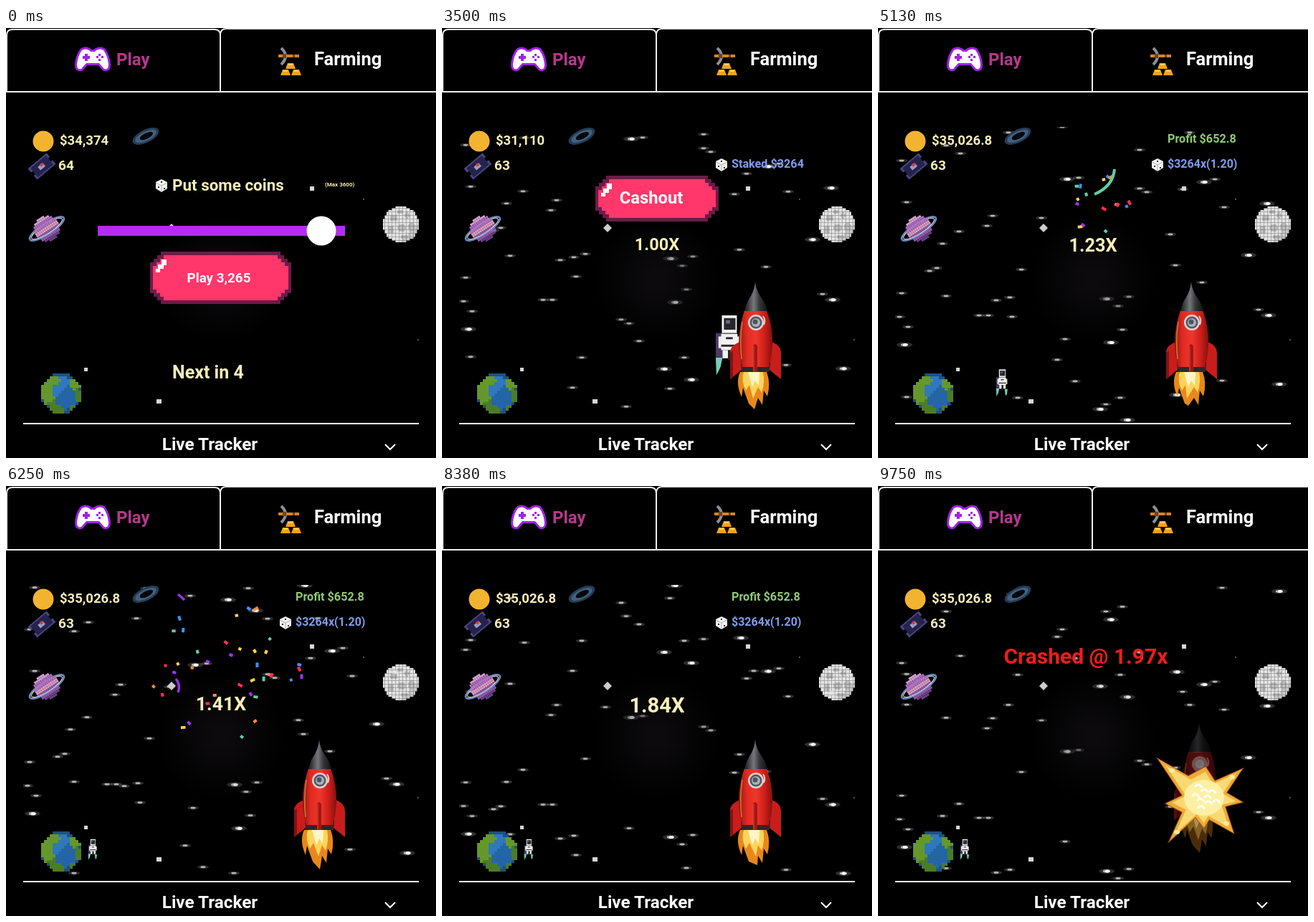
Animation of 600 by 600 pixels, one loop 9880 ms. Source, as an HTML page with a canvas:

```html
<!DOCTYPE html>
<html lang="en">
<head>
<meta charset="utf-8">
<title>Rocket game</title>
<style>
  html, body { margin: 0; width: 100%; height: 100%; overflow: hidden; background: #000; }
  canvas, svg { position: absolute; left: 0; top: 0; width: 600px; height: 600px; }
  text { font-family: Roboto, sans-serif; font-weight: 700; fill: #f8efb8; }
  .white { fill: #fff; }
  .blue { fill: #7f9cea; }
  .mid { text-anchor: middle; }
</style>
</head>
<body>
<canvas id="stage" width="600" height="600"></canvas>
<svg viewBox="0 0 600 600">
  <text x="154" y="52" font-size="24" style="fill:#b4398c">Play</text>
  <text x="430" y="52" font-size="25.5" class="white">Farming</text>
  <text x="284.5" y="589" font-size="24.3" class="white mid">Live Tracker</text>
  <text id="balance" x="75" y="163" font-size="18.5"></text>
  <text id="tickets" x="73" y="198" font-size="19"></text>
  <g id="lobby">
    <text x="232" y="227" font-size="22.4">Put some coins</text>
    <text x="445" y="221" font-size="8">(Max 3600)</text>
    <text id="bet" x="297" y="355" font-size="18.8" class="white mid"></text>
  </g>
  <g id="waiting">
    <text x="232" y="227" font-size="22.5">Staked 3264</text>
    <text x="266" y="281" font-size="23.5" class="mid">Prepare to Cashout</text>
  </g>
  <text id="countdown" x="232" y="489" font-size="25"></text>
  <g id="riding">
    <text x="404" y="195" font-size="16.2" class="blue">Staked $3264</text>
    <text x="292" y="245" font-size="23.8" class="white mid">Cashout</text>
  </g>
  <g id="cashed">
    <text x="404" y="160" font-size="16.2" style="fill:#8fcb72">Profit $652.8</text>
    <text x="404" y="195" font-size="16" class="blue">$3264x(1.20)</text>
  </g>
  <text id="multiplier" x="300" class="mid"></text>
  <text id="crashed" x="290" y="248" font-size="30" class="mid" style="fill:#f01c1c">Crashed @ 1.97x</text>
</svg>
<script>
const LOOP = 9880, BEAT = 125, LAST_BEAT = 78;
const STAKE = 1000, LAUNCH = 2750, CLIMB = 3470, CASHOUT = 4750, CRASH = 8875;
const el = id => document.getElementById(id);
const ctx = el('stage').getContext('2d');
const clamp = v => Math.max(0, Math.min(1, v));
const easeOut = v => 1 - (1 - clamp(v)) ** 3;
const rand = n => { const v = Math.sin(n * 127.1 + 3.7) * 43758.5453; return v - Math.floor(v); };

// x, y, size
const nearStars = [[319,352,2],[264,185,2],[280,183,1],[187,377,1],[165,354,1],[184,350,1],
  [341,395,1],[325,413,2],[350,349,1],[95,348,1],[82,309,1],[310,94,2],[417,74,2],[338,78,1],
  [195,78,1],[113,258,1],[90,275,1],[375,203,1],[365,198,1],[275,55,1],[335,362,1],[72,313,1],
  [40,489,1],[182,532,1],[435,120,1],[250,437,1],[95,138,1],[408,262,1],[348,521,2]];
const farStars = [[517,307,2],[545,391,2],[531,383,1],[42,407,1],[37,432,2],[154,391,1],[141,391,1],
  [261,424,1],[33,360,1],[30,393,1],[483,240,1],[543,235,2],[452,345,1],[415,321,1],[33,175,1],
  [40,233,1],[228,255,1],[160,252,1],[152,266,1],[365,160,1],[318,515,1],[95,515,1],[455,205,2],
  [470,201,1],[425,215,1],[200,327,1],[560,75,2],[480,70,1],[257,128,1],[115,165,1]];

function rects(color, ...list) {
  ctx.fillStyle = color;
  for (const r of list) ctx.fillRect(...r);
}
function oval(x, y, rx, ry, color) {
  ctx.fillStyle = color;
  ctx.beginPath();
  ctx.ellipse(x, y, rx, ry, 0, 0, 7);
  ctx.fill();
}
const disc = (x, y, r, color) => oval(x, y, r, r, color);
function shape(d, fill, stroke, width = 2) {
  const path = new Path2D(d);
  if (stroke) { ctx.strokeStyle = stroke; ctx.lineWidth = width; ctx.stroke(path); }
  if (fill) { ctx.fillStyle = fill; ctx.fill(path); }
}
function at(x, y, angle, scale, draw) {
  ctx.save();
  ctx.translate(x, y);
  ctx.rotate(angle * Math.PI / 180);
  ctx.scale(scale, scale);
  draw();
  ctx.restore();
}
function inSky(draw) {
  ctx.save();
  ctx.beginPath();
  ctx.rect(24, 138, 552, 413);
  ctx.clip();
  draw();
  ctx.restore();
}
function gradient(x0, x1, ...stops) {
  const g = ctx.createLinearGradient(x0, 0, x1, 0);
  for (const [color, p] of stops) g.addColorStop(p, color);
  return g;
}
function pixelDisc(cx, cy, r, cell, colorAt) {
  for (let y = -r; y < r; y += cell)
    for (let x = -r; x < r; x += cell) {
      const u = (x + cell / 2) / r, v = (y + cell / 2) / r;
      if (u * u + v * v < 1) rects(colorAt(u, v), [cx + x, cy + y, cell, cell]);
    }
}
const inBlob = (u, v, blobs) =>
  blobs.some(([x, y, rx, ry]) => ((u - x) / rx) ** 2 + ((v - y) / ry) ** 2 < 1);

function pixelBox(x, y, w, h, color, s = 5) {
  for (let k = 0; k < 4; k++)
    rects(color, [x + k * s, y + (3 - k) * s, w - 2 * k * s, h - 2 * (3 - k) * s]);
}
function button(x, y, w, h) {
  pixelBox(x, y, w, h, '#6b1c48');
  pixelBox(x + 4, y + 5, w - 8, h - 10, '#ff376a');
  rects('#fff', [x + 16, y + 11, 7, 8], [x + 11, y + 18, 8, 6], [x + 8, y + 24, 6, 5]);
}
function dice(x, y) {
  shape(`M${x} ${y - 9}l8 4v9l-8 5l-8 -5v-9z`, '#f4f4f4');
  shape(`M${x - 8} ${y - 4}l8 4l8 -4M${x} ${y}v9`, null, '#a9a9a9', 1);
  rects('#333', [x - 1, y - 6, 2, 2], [x - 5, y + 1, 2, 2], [x + 3, y + 3, 2, 2]);
}

function drawHeader() {
  shape('M1 89V10Q1 2 9 2H291Q299 2 299 10V89M299 10Q299 1 307 1H600M0 89H600', null, '#eee');
  shape('M24 552H576M529 581l7 7l7 -7', null, '#fff');
  shape('M106 31q5-3 10 0l2 2h6l2-2q6-3 10 0q6 8 7 20q0 8-6 6l-7-8h-18l-7 8q-6 2-6-6q1-12 7-20z',
    '#fff', '#a021e8', 6);
  rects('#a021e8', [110, 36, 4, 10], [107, 39, 10, 4], [129, 36, 3, 3], [129, 43, 3, 3],
    [126, 39, 3, 3], [133, 39, 3, 3]);
  shape('M384 28q12 11 0 23', null, '#8b8f98', 4);
  rects('#d9822b', [380, 37, 29, 4]);
  rects('#6b4428', [386, 36, 5, 6], [400, 37, 3, 4]);
  for (const [x, y] of [[397, 49], [390, 58], [405, 58]]) {
    shape(`M${x - 4} ${y}h8l3 8h-14z`, '#f3a21b');
    rects('#ffd45a', [x - 3, y + 1, 6, 2]);
  }
}

function drawSaturn() {
  const ring = (begin, end) => {
    for (const [r, color, w] of [[28, '#7288b5', 3], [25, '#d2d9ee', 1]]) {
      ctx.strokeStyle = color;
      ctx.lineWidth = w;
      ctx.beginPath();
      ctx.ellipse(0, 0, r, r * 0.27, 0, begin, end);
      ctx.stroke();
    }
  };
  at(57, 280, -33, 1, () => {
    const bands = ['#d9a4d8', '#b06fc0', '#e0a0c4', '#9a58ad', '#70408c'];
    ring(Math.PI, 2 * Math.PI);
    pixelDisc(0, 0, 18, 3, (u, v) => bands[Math.floor((v + 1) * 2.5)]);
    ring(0, Math.PI);
  });
}

function drawSpaceProps() {
  const glow = ctx.createRadialGradient(300, 350, 10, 300, 350, 90);
  glow.addColorStop(0, 'rgba(20,17,21,.6)');
  glow.addColorStop(1, 'rgba(20,17,21,0)');
  rects(glow, [200, 250, 200, 200]);

  disc(52, 158, 14.5, '#f2b430');
  at(50, 193, -40, 1, () => {
    rects('#4a4684', [-17, -10, 34, 20]);
    rects('#25224d', [-14, -8, 28, 16]);
    rects('#000', [-18, -3, 4, 6], [14, -3, 4, 6]);
    rects('#9aa0c8', [-5, -3, 9, 6]);
    rects('#e0323c', [-1, -4, 4, 4]);
  });
  at(195, 151, -26, 1, () => {
    oval(0, 0, 20, 9, '#263c55');
    oval(0, 0, 16, 6.5, '#41617f');
    oval(1, 0, 10, 4, '#05070c');
  });
  drawSaturn();

  const craters = [[-.4, -.35, .25, .2], [.35, -.5, .2, .16], [.05, .2, .22, .2], [-.55, .3, .17, .2],
    [.6, .15, .18, .25], [.2, .7, .25, .12], [-.05, -.7, .13, .12]];
  pixelDisc(551, 274, 25, 2.5, (u, v) =>
    inBlob(u, v, craters) ? '#bdbdbd' : u + v > .95 ? '#c9c9c9' : '#e3e3e3');
  const land = [[-.72, -.1, .33, .42], [-.4, -.65, .38, .25], [-.55, .35, .3, .3], [-.2, .82, .35, .2],
    [.72, -.5, .25, .32], [.9, .15, .18, .3], [.55, .72, .2, .18]];
  pixelDisc(77, 510, 28, 4, (u, v) => inBlob(u, v, land)
    ? (u + v * 2 > .3 ? '#4b7d24' : '#65982c')
    : (u * u + v * v > .7 ? '#1d527f' : u + v < 0 ? '#2f78bd' : '#2465a5'));

  rects('#d6d6d6', [424, 221, 6, 6], [109, 474, 5, 5], [210, 518, 7, 6]);
  shape('M231 273l6 6l-6 6l-6 -6z', '#ccc');
  rects('#555', [574, 434, 2, 2], [498, 238, 2, 2]);
}

function drawStars(stars, speed, t) {
  for (const [x, y, size] of stars) {
    const drop = y + speed * (t - 4375) / 1000 - 138;
    const py = 138 + ((drop % 412) + 412) % 412;
    oval(x, py, 5 + size * 3, 1.5 + size, 'rgba(150,150,150,.3)');
    oval(x, py, 2 + size * 1.6, .7 + size * .7, 'rgba(225,225,225,.75)');
    if (size > 1) oval(x + 1, py, 3, 2, '#fff');
  }
}

function drawHourglass(beat) {
  at(301, 347, -48 + (beat - 17) * 45, 1, () => {
    shape('M-12 -23H12V-16L3 -2H-3L-12 -16Z', null, '#fff', 4);
    shape('M-3 -2H3L14 13V24H-14V13Z', '#fff');
    rects('#fff', [-7, -10, 14, 5], [-4, -5, 8, 5]);
  });
}

function drawAstronaut(x, y, scale) {
  at(x, y, 0, scale, () => {
    rects('#4a3a66', [-19, -14, 10, 36]);
    rects('#f2f2f2', [-10, -40, 22, 26], [-11, -13, 24, 24], [-9, 11, 8, 12], [4, 11, 8, 12],
      [-15, -9, 5, 17], [12, -9, 5, 17]);
    rects('#26262c', [-7, -36, 17, 17], [-4, -8, 10, 3], [-11, 3, 24, 3], [-1, 12, 5, 14]);
    rects('#6b6b78', [-4, -33, 6, 5]);
    shape('M-19 22h10l-3 14l-6 12zM9 24h9l-2 18l-5 3z', '#77cfb5');
  });
}

function drawRocket(beat) {
  const sway = [0, -3, 2, 4][beat % 4], tail = [532, 527, 535, 529][beat % 4];
  shape(`M416 480Q409 495 418 515L420 502L428 524L${436 + sway} ${tail}L441 516L447 526
    L449 506L454 514Q459 495 453 480Z`, '#e8881c');
  shape(`M421 480Q417 492 424 506L429 498L${434 + sway} 517L441 501L446 509Q451 494 448 480Z`, '#ffd45c');
  shape('M427 480L433 501L437 492L442 499L443 480Z', '#fff6c8');

  const red = gradient(412, 464, ['#81120f', 0], ['#e12a22', .25], ['#f0372c', .5],
    ['#c81d19', .75], ['#6e0d0c', 1]);
  const steel = gradient(424, 453, ['#26262a', 0], ['#77777c', .38], ['#36363b', .65], ['#151518', 1]);
  shape('M416 438Q402 443 402 453V490L418 477ZM460 438Q473 443 473 453V490L457 477Z', '#c91d1b');
  shape('M402 453V490L406 486V450Z', '#811413');
  rects('#29292d', [418, 470, 39, 10]);
  shape('M422 394H453Q462 418 461 442Q460 460 456 473H419Q414 458 414 440Q414 417 422 394Z', red);
  shape('M437 354Q438 366 446 377Q452 385 454 395H422Q425 382 431 374Q436 365 437 354Z', steel);
  shape('M419 410Q415 435 418 462', null, '#c9822e', 1.5);
  disc(438, 411, 11, '#d6d6d8');
  disc(438, 411, 8.5, '#55565c');
  disc(438, 411, 6, '#a9b2bb');
  disc(437, 410, 3.5, '#4c5661');
  shape('M448 402q4 6 1 12', null, '#f9c8bd');
  shape('M434 444Q437 438 440 444V480H434Z', '#a31614');
  shape('M435 444V479', null, '#e04c3e', 1);
}

function drawExplosion(scale) {
  const burst = `M-64 -54L-22 -30L2 -43L15 -23L53 -40L31 -7L53 6L29 12L41 49L7 30L0 42L-12 27
    L-48 60L-30 20L-53 8L-30 -3Z`;
  at(455, 435, 0, scale, () => {
    shape(burst, '#efab36', '#9c5416');
    at(0, 0, 0, .84, () => shape(burst, '#f9da72'));
    oval(0, 0, 28, 25, '#fcf0a4');
    for (let i = 0; i < 9; i++) {
      const a = i * 2.4, r = 5 + i * 1.7;
      shape(`M${Math.cos(a) * r - 5} ${Math.sin(a) * r}q5 -7 10 1`, null, '#fffdf0', 3);
    }
    for (const [x, y] of [[-45, -38], [39, -29], [-38, 48], [31, 36]]) oval(x, y, 4, 3, '#ffe9a0');
  });
}

function drawConfetti(age) {
  const colors = ['#ff2d57', '#ffd64a', '#3e91f5', '#5ecfa4', '#a034f0', '#ff8a3d'];
  const spread = 1 - Math.exp(-age / .9), size = clamp((2.8 - age) * 2);
  const count = age < .5 ? 16 : 38;
  for (let i = 0; i < count; i++) {
    const angle = rand(i) * 6.283, reach = 35 + 120 * rand(i + 50);
    const x = 308 + Math.cos(angle) * reach * spread;
    const y = 244 + Math.sin(angle) * reach * .8 * spread + 7 * age * age;
    at(x, y, rand(i + 90) * 180 + age * 160, size, () =>
      rects(colors[i % 6], [-3, -2, 4 + 3 * rand(i + 20), 4]));
  }
  if (age < .9) shape('M330 197Q328 221 302 232', null, '#5ecfa4', 4);
  else if (age < 2.2) {
    const sink = (age - 1.5) * 15;
    shape(`M237 ${269 + sink}q7 9 3 19M240 ${151 + sink}l9 8`, null, '#9a2eee', 3.5);
  }
}

function drawFlight(t, beat) {
  const rise = 200 * (1 - easeOut((t - LAUNCH) / 600));
  if (t < CASHOUT) drawAstronaut(400, 439 + rise, .95);
  else {
    const p = easeOut((t - CASHOUT) / 875);
    drawAstronaut(400 - 279 * p, 439 + 67 * p, .33 + .62 * (1 - p) ** 1.1);
  }
  const fade = clamp((t - CRASH) / 875);
  ctx.save();
  ctx.globalAlpha = 1 - .68 * fade;
  ctx.translate(11 * fade, rise - 23 * fade);
  drawRocket(beat);
  ctx.restore();
  if (t >= CRASH) drawExplosion(.35 + .65 * easeOut((t - CRASH) / 500));
  const age = (t - CASHOUT) / 1000;
  if (age > 0 && age < 2.8) drawConfetti(age);
}

const show = (id, on) => { el(id).style.display = on ? '' : 'none'; };

function updateText(t) {
  const flying = t >= LAUNCH, cashed = t >= CASHOUT, crashed = t >= CRASH;
  const growth = Math.max(1, Math.exp(.1247 * (t - CLIMB) / 1000));
  el('balance').textContent = t < STAKE ? '$34,374' : cashed ? '$35,026.8' : '$31,110';
  el('tickets').textContent = t < STAKE ? '64' : '63';
  el('bet').textContent = t < 500 ? 'Play 3,265' : 'Play 3,264';
  el('countdown').textContent = 'Next in ' + (t < 250 ? 4 : t < 1125 ? 3 : t < 2000 ? 2 : 1);
  const multiplier = el('multiplier');
  multiplier.textContent = growth.toFixed(2) + 'X';
  multiplier.setAttribute('font-size', 24.5 * (growth / 1.12) ** .35);
  multiplier.setAttribute('y', 311 + (growth - 1.12) * 7);
  show('lobby', t < STAKE);
  show('waiting', t >= STAKE && !flying);
  show('countdown', !flying);
  show('riding', flying && !cashed);
  show('cashed', cashed && !crashed);
  show('multiplier', flying && !crashed);
  show('crashed', crashed);
}

function render(beat) {
  const t = beat * BEAT;
  rects('#000', [0, 0, 600, 600]);
  drawHeader();
  if (t >= LAUNCH) inSky(() => {
    drawStars(farStars, 13.4, t);
    drawStars(nearStars, 34.5, t);
  });
  drawSpaceProps();
  if (t < STAKE) {
    rects('#b32cf0', [128, 276, 345, 14]);
    disc(440, 283, 20.5, '#fff');
    button(201, 312, 197, 73);
  } else if (t < LAUNCH) drawHourglass(beat);
  if (t < LAUNCH) dice(217, 220);
  else {
    if (t < CRASH) dice(390, 191);
    if (t < CASHOUT) button(214, 206, 172, 64);
    inSky(() => drawFlight(t, beat));
  }
  updateText(t);
}

const start = performance.now();
let shown = -1;
function tick() {
  const beat = Math.min(LAST_BEAT, Math.floor(((performance.now() - start) % LOOP) / BEAT));
  if (beat !== shown) render(shown = beat);
  requestAnimationFrame(tick);
}
tick();
</script>
</body>
</html>
```
